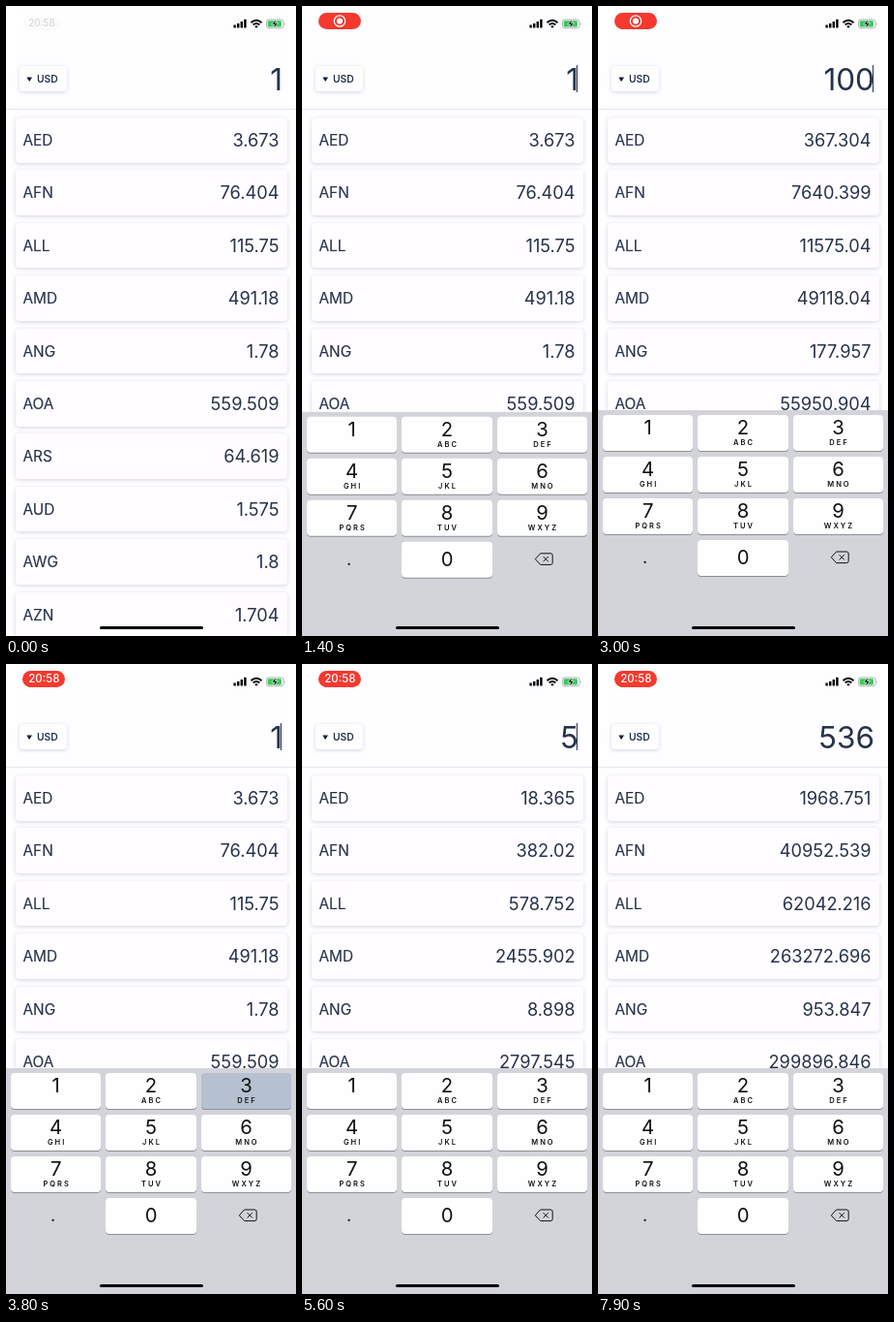
An HTML page that plays this animation: 300x650 px, repeating every 8000 ms.

```html
<!DOCTYPE html>
<html lang="en">
<head>
<meta charset="utf-8">
<title>Currency converter</title>
<style>
html, body { margin: 0; width: 100%; height: 100%; overflow: hidden; background: #fefdff; }
#stage { position: absolute; left: 0; top: 0; width: 300px; height: 650px; overflow: hidden;
  background: #fefdff; color: #26324b; font-family: Inter, "Open Sans", sans-serif; }
#stage div, #stage svg { position: absolute; }
#pill { left: 17.3px; top: 7.2px; width: 44px; height: 17px; border-radius: 8.5px; }
#time { width: 44px; line-height: 17.5px; text-align: center; font-size: 11.5px; font-weight: 500; }
#base { left: 14px; top: 61.5px; width: 48.5px; height: 26.5px; border-radius: 4px;
  background: #fffeff; box-shadow: 0 1px 4px rgba(50, 50, 80, .2); }
#base div { left: 18px; line-height: 27px; font-size: 10.3px; font-weight: 600; }
#amount { right: 14px; top: 55px; line-height: 41px; font-size: 31.5px; font-weight: 400; white-space: pre; }
#caret { left: 284px; top: 61px; width: 1.3px; height: 28px; background: #26324b; }
#rule { top: 106px; width: 300px; height: 1px; background: #e7e5ea; }
.card { left: 9.5px; width: 281px; height: 46.5px; border-radius: 4px; background: #fffdff;
  line-height: 47px; box-shadow: 0 1px 4px rgba(50, 50, 80, .2); }
.code { left: 8px; font-size: 15.4px; font-weight: 400; -webkit-text-stroke: .15px; }
.value { right: 8px; font-size: 18.2px; font-weight: 400; }
#pad { top: 417px; width: 300px; height: 233px; background: #d2d4da; color: #111; text-align: center; }
.key { width: 93.7px; height: 36.7px; border-radius: 4px; background: #fefeff; box-shadow: 0 1px 0 #8d8f94; }
.key.down { background: #b5c0d0; }
.digit { width: 100%; line-height: 26px; font-size: 20.3px; font-weight: 400; }
.letters { width: 100%; top: 23.8px; line-height: 10px; font-size: 7.5px; font-weight: 600;
  letter-spacing: 2px; text-indent: 2px; }
#dot { left: 44.5px; top: 139px; width: 8px; font-size: 18px; line-height: 26px; }
#home { left: 97px; top: 639.7px; width: 106.5px; height: 3.6px; border-radius: 2px; background: #000; }
</style>
</head>
<body>
<div id="stage">
  <div id="pill">
    <div id="time">20:58</div>
    <svg id="rec" width="44" height="17" fill="none" stroke="#fff">
      <circle cx="22" cy="8.5" r="5.7" stroke-width="1.2"/>
      <circle cx="22" cy="8.5" r="3.1" fill="#fff" stroke="none"/>
    </svg>
  </div>
  <svg width="300" height="30">
    <path d="M235.4 19.6h2.4v2.8h-2.4zM239 18h2.4v4.4H239zM242.6 16h2.4v6.4h-2.4zM246.2 13.8h2.4v8.6h-2.4z"/>
    <g fill="none" stroke="#000" stroke-width="1.8">
      <path d="M253.5 17.2q5.5-4.8 11 0M255.6 19.4q3.4-2.8 6.8 0"/>
    </g>
    <path d="M257.1 20.9q1.9-1.3 3.8 0L259 22.8z"/>
    <rect x="269.4" y="14" width="17.6" height="8.8" rx="2.5" fill="none" stroke="#a4a6a8" stroke-width=".9"/>
    <rect x="270.7" y="15.3" width="14.2" height="6.2" rx="1.3" fill="#35c759"/>
    <path d="M288 16.9q1.5 1.5 0 3z" fill="#a4a6a8"/>
    <path d="M279.5 13.5l-4.7 5.4h2.8l-1 4.4 4.9-5.6h-2.9z" stroke="#fff" stroke-width=".7"/>
  </svg>
  <div id="base">
    <svg width="18" height="27"><path d="M7.4 11.5h5.6l-2.8 4.6z" fill="#111a2c"/></svg>
    <div>USD</div>
  </div>
  <div id="amount"></div>
  <div id="caret"></div>
  <div id="rule"></div>
  <div id="list"></div>
  <div id="pad">
    <div id="dot">.</div>
    <svg style="left:240px;top:145px" width="22" height="14" fill="none" stroke="#111" stroke-width="1">
      <path id="eraser" d="M6.6 1h10.6q2 0 2 2v7.6q0 2-2 2H6.6L1.3 6.8z" stroke-linejoin="round"/>
      <path id="cross" d="M9.6 4.2l5.2 5.2M14.8 4.2l-5.2 5.2"/>
    </svg>
  </div>
  <div id="home"></div>
</div>
<script>
const LOOP = 8000;
const FOCUS = 1000;
const $ = id => document.getElementById(id);
const rates = {
  AED: 3.673043, AFN: 76.40399, ALL: 115.750403, AMD: 491.180403, ANG: 1.779566,
  AOA: 559.509041, ARS: 64.619, AUD: 1.575, AWG: 1.8, AZN: 1.704
};
const letters = ['', 'ABC', 'DEF', 'GHI', 'JKL', 'MNO', 'PQRS', 'TUV', 'WXYZ'];

// [key, pressed at, released at]; the digit is entered on release
const presses = [
  ['0', 1900, 2000], ['0', 2100, 2200], ['0', 2300, 2400],
  ['del', 2800, 2900], ['del', 3100, 3200], ['del', 3400, 3500],
  ['3', 3800, 3900], ['del', 4500, 4700], ['del', 5300, 5500],
  ['5', 5500, 5600], ['3', 6800, 7000], ['6', 7200, 7300]
];

function add(parent, cls, text = '') {
  const el = document.createElement('div');
  el.className = cls;
  el.textContent = text;
  parent.append(el);
  return el;
}

const values = Object.entries(rates).map(([code, rate], i) => {
  const card = add($('list'), 'card');
  card.style.top = 115 + i * 54.4 + 'px';
  add(card, 'code', code);
  return { rate, el: add(card, 'value') };
});
$('list').style.top = '0';

const keys = {};
function addKey(digit, col, row, sub) {
  const key = keys[digit] = add($('pad'), 'key');
  key.style.left = 4.8 + col * 98.4 + 'px';
  key.style.top = 5 + row * 43.1 + 'px';
  const label = add(key, 'digit', digit);
  if (sub === undefined) label.style.lineHeight = '36px';
  else add(key, 'letters', sub);
}
letters.forEach((sub, i) => addKey(String(i + 1), i % 3, Math.floor(i / 3), sub));
addKey('0', 1, 3);

const clamp = x => Math.max(0, Math.min(1, x));
const mix = (a, b, p) => a.map((v, i) => Math.round(v + (b[i] - v) * p));

function drawPill(t) {
  const red = clamp(t / 400);
  const rest = 1 - red;
  const icon = clamp((t - 900) / 200) * (1 - clamp((t - 3000) / 200));
  $('pill').style.background = `rgb(${mix([252, 251, 253], [245, 57, 47], red)})`;
  $('pill').style.transform = `translate(${-2 * rest}px, ${2.8 * rest}px) scale(${1 - .15 * rest})`;
  $('time').style.color = `rgb(${mix([217, 216, 221], [255, 255, 255], red)})`;
  $('time').style.opacity = 1 - icon;
  $('rec').style.opacity = icon;
}

let shown = null;
function drawAmount(text) {
  if (text === shown) return;
  shown = text;
  $('amount').textContent = text;
  for (const { rate, el } of values) el.textContent = +(rate * text).toFixed(3);
}

function draw(t) {
  let text = '1', edited = FOCUS, held = null;
  for (const [key, from, to] of presses) {
    if (t >= to) {
      text = key === 'del' ? text.slice(0, -1) : text + key;
      edited = to;
    } else if (t >= from) held = key;
  }
  drawAmount(text);
  drawPill(t);

  const caretOn = t >= FOCUS && (t - edited) % 1000 < 550;
  $('caret').style.visibility = caretOn ? 'visible' : 'hidden';

  for (const k in keys) keys[k].classList.toggle('down', k === held);
  const erasing = held === 'del';
  $('eraser').setAttribute('fill', erasing ? '#111' : 'none');
  $('cross').setAttribute('stroke', erasing ? '#fff' : '#111');

  const rest = 1 - clamp((t - FOCUS) / 500);
  $('pad').style.transform = `translateY(${233 * rest ** 3}px)`;
}

const start = performance.now();
function tick() {
  draw((performance.now() - start) % LOOP);
  requestAnimationFrame(tick);
}
tick();
</script>
</body>
</html>
```
